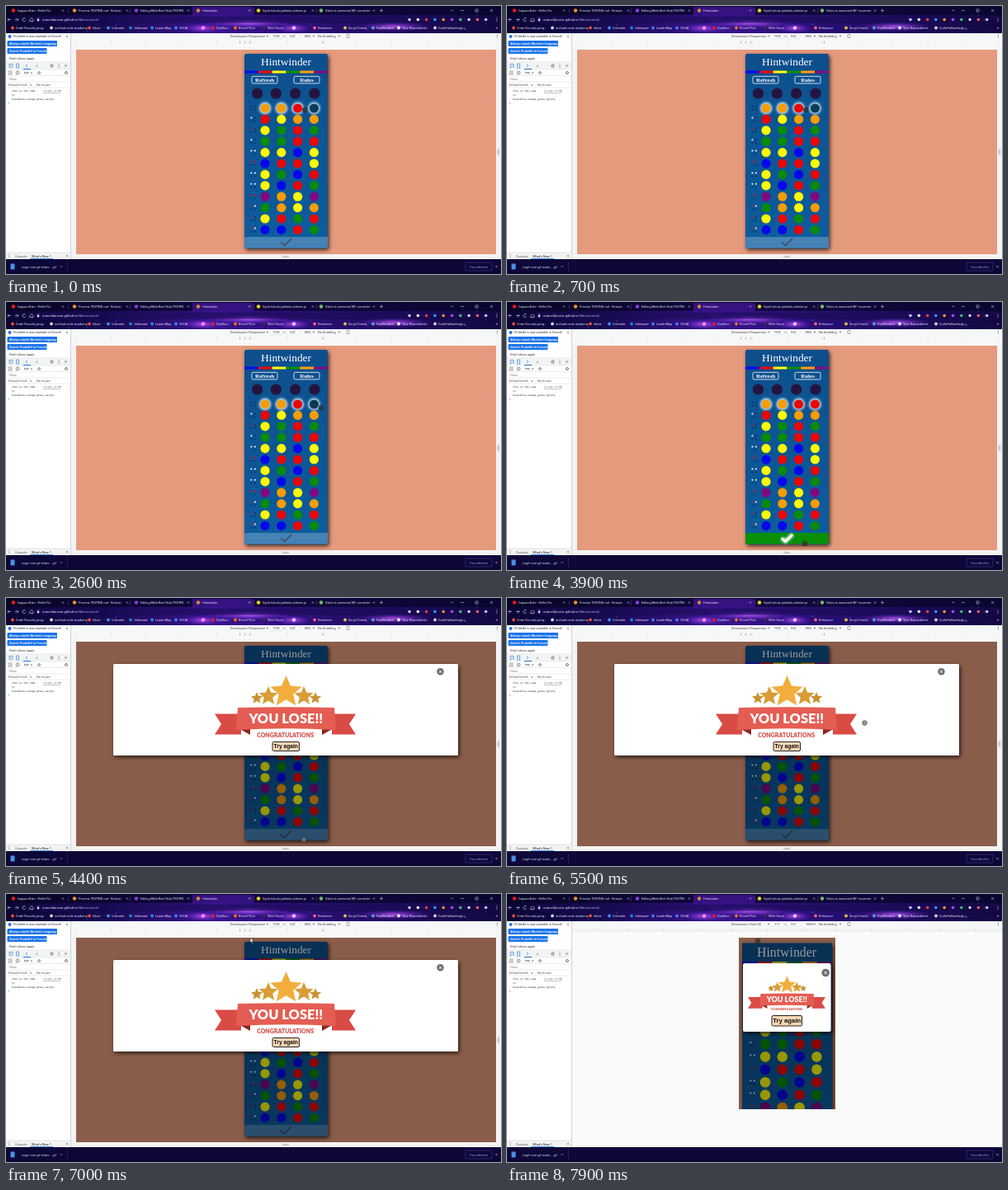
Animation of 600 by 325 pixels, one loop 8000 ms. Source, as an HTML page:

```html
<!DOCTYPE html>
<html lang="en">
<head>
<meta charset="utf-8">
<title>Peg game</title>
<style>
html, body { margin: 0; width: 100%; height: 100%; overflow: hidden; background: #fff; }
svg { display: block; width: 600px; height: 325px; }
text { font-family: Roboto, "Open Sans", sans-serif; white-space: pre; }
.serif { font-family: "Liberation Serif", "Noto Serif", serif; }
.mono { font-family: "DejaVu Sans Mono", "Noto Sans Mono", monospace; }
.bold { font-family: Lato, "Open Sans", sans-serif; font-weight: 900; }
.button { font-family: "Liberation Sans", sans-serif; font-weight: 700; }
</style>
</head>
<body>
<svg id="stage" viewBox="0 0 600 325">
<defs>
  <linearGradient id="sky">
    <stop offset="0" stop-color="#0b0634"/><stop offset=".2" stop-color="#170a52"/>
    <stop offset=".42" stop-color="#3b1390"/><stop offset=".6" stop-color="#2a0f78"/>
    <stop offset=".8" stop-color="#1d0b5c"/><stop offset="1" stop-color="#12083f"/>
  </linearGradient>
  <linearGradient id="frame">
    <stop offset="0" stop-color="#080428"/><stop offset=".5" stop-color="#12083f"/><stop offset="1" stop-color="#0a0530"/>
  </linearGradient>
  <linearGradient id="board" x2="0" y2="1">
    <stop offset="0" stop-color="#0b4f8c"/><stop offset="1" stop-color="#0d5c9e"/>
  </linearGradient>
  <radialGradient id="nebula"><stop offset="0" stop-color="#c85cff" stop-opacity=".85"/><stop offset="1" stop-color="#5a20c8" stop-opacity="0"/></radialGradient>
  <filter id="glow" x="-1" y="-1" width="3" height="3"><feGaussianBlur stdDeviation="1.5"/></filter>
  <filter id="shadow" x="-.2" y="-.2" width="1.4" height="1.4"><feDropShadow dx="1.5" dy="2" stdDeviation="2.6" flood-opacity=".75"/></filter>
  <clipPath id="phoneClip"><rect x="281" y="53" width="117" height="208"/></clipPath>
</defs>
</svg>
<script>
const LOOP = 8000, MODAL_AT = 4300, PHONE_AT = 7500;
const COLORS = { b: '#0808f0', r: '#ee0808', y: '#ffff08', g: '#0a8f0a', o: '#f8a008', p: '#820a82', n: '#0c3d55' };
const ROWS = ['oorn', 'ryoo', 'ygrg', 'ggrr', 'yyby', 'brry', 'ygbr', 'ybrg', 'poyp', 'goyo', 'yrgr', 'bbrg'];
const PEGS = ['', 'w', 'r', 'w', 'ww', 'rr', 'ww', 'ww', 'rr', 'rw', 'r', 'rw'];
const GAME = 'Hintwinder';

const attrs = o => Object.entries(o).map(([k, v]) => ` ${k}="${v}"`).join('');
const rect = (x, y, w, h, fill, o = {}) => `<rect${attrs({ x, y, width: w, height: h, fill, ...o })}/>`;
const disc = (cx, cy, r, fill, o = {}) => `<circle${attrs({ cx, cy, r, fill, ...o })}/>`;
const path = (d, stroke, w = .6, o = {}) => `<path${attrs({ d, stroke, 'stroke-width': w, fill: 'none', ...o })}/>`;
const text = (x, y, s, fill, size = 4, o = {}) => `<text${attrs({ x, y, fill, 'font-size': size, ...o })}>${s}</text>`;
const middle = { 'text-anchor': 'middle' };
const group = (id, body, o = {}) => `<g${attrs({ id, ...o })}>${body}</g>`;
const cross = (x, y, r, color, w) => path(`M${x - r} ${y - r}l${2 * r} ${2 * r}m0 ${-2 * r}l${-2 * r} ${2 * r}`, color, w);
const caret = (x, y, color = '#555') => `<path d="M${x - 1.2} ${y - .6}h2.4l-1.2 1.6z" fill="${color}"/>`;

function seeded(seed) {
  return () => (seed = (seed * 16807) % 2147483647) / 2147483647;
}

function star(cx, cy, r, fill) {
  const points = Array.from({ length: 10 }, (_, i) => {
    const a = i * Math.PI / 5 - Math.PI / 2, d = i % 2 ? r * .46 : r;
    return `${(cx + d * Math.cos(a)).toFixed(1)},${(cy + d * Math.sin(a)).toFixed(1)}`;
  });
  return `<polygon points="${points.join(' ')}" fill="${fill}"/>`;
}

function browserTop() {
  const random = seeded(41), ink = '#e9e4ff';
  let s = rect(0, 0, 600, 33, 'url(#sky)') + rect(0, 0, 600, 11, 'url(#frame)');
  for (const [x, y, rx] of [[238, 27, 24], [348, 27, 22], [295, 21, 55], [470, 25, 45]])
    s += `<ellipse cx="${x}" cy="${y}" rx="${rx}" ry="6" fill="url(#nebula)"/>`;
  for (let i = 0; i < 90; i++)
    s += disc((random() * 600).toFixed(1), (11 + random() * 21).toFixed(1), (.15 + random() * .4).toFixed(2), '#b99cff', { opacity: .65 });
  s += '<path d="M226 11V3q0-2 2-2h70q2 0 2 2v8z" fill="#34127f"/>';
  const tabs = [
    [9, '#f01818', "L'aquarelliste - Reflet Du", 69], [83, '#f09030', `Preview TESTING.md - ${GAME.slice(0, 7)}`, 147],
    [158, '#8a3fd0', 'Editing Melo-Reef-Hub/TESTIN', 221], [233, '#d8843c', GAME, 295],
    [306, '#e8d820', 'Využi tuhoto pokladu odmien pr', 372], [382, '#70c060', 'Video to animated GIF converter', 446]
  ];
  for (const [x, color, label, close] of tabs)
    s += disc(x, 5.5, 2.2, color) + text(x + 5, 7, label, ink, 3.8) + cross(close, 5.5, 1, ink, .5);
  for (const x of [75, 150, 300, 376]) s += rect(x, 3, .4, 6, '#6656a0');
  s += path('M453 5.5h4m-2-2v4M539.5 4.5l1.5 1.5 1.5-1.5M551 5.5h4M587 4l3 3m0-3l-3 3', ink, .5) + rect(569, 4, 3, 3, 'none', { stroke: ink, 'stroke-width': .5 });
  s += path('M6 16.5H2m1.8-1.8L2 16.5l1.8 1.8M11 16.5h4m-1.8-1.8l1.8 1.8-1.8 1.8M23.6 15.4a2 2 0 1 0 .2 2M29 16.5l2-2 2 2v2h-4z', ink);
  s += rect(35, 12.5, 463, 8, '#180b50', { rx: 4, opacity: .55 }) + rect(37.8, 16, 2.4, 2.2, ink) + path('M38.2 16v-.8a.8.8 0 0 1 1.6 0v.8', ink, .4);
  s += text(44, 18, 'marcelduvern.github.io<tspan fill="#a99fd2">/Mastermind/</tspan>', ink, 4.2);
  ['#c8c0e8', '#f0f0f0', '#e04040', '#30a0f0', '#e8a020', '#a050e0', '#40c070', '#d0d0e8', '#e86060', '#c8c0e8']
    .forEach((c, i) => s += disc(489 + i * 10.3, 16.5, 1.8, c));
  s += path('M595 14.5v.1m0 1.8v.1m0 1.8v.1', ink, .9, { 'stroke-linecap': 'round' });
  const links = [
    [12, 'Code Foundry prog...', '#e85030'], [59, 'orchard code academy', '#d0d0e0'], [105, 'Inbox', '#e84838'],
    [128, 'Calendar', '#3a90f0'], [155, 'Jobboard', '#2080d0'], [181, 'Leads Map', '#3088d8'], [210, 'VELM', '#3a80ff'],
    [255, 'ClipBarn', '#f01818'], [282, 'Kernel Post', '#f07020'], [317, 'Web Chum', '#303050'], [378, 'Reference', '#f06080'],
    [415, 'Script Coach', '#e0c040'], [449, 'KeyMeadow', '#50a0d0'], [480, 'Your Repositories', '#e8e8f0'], [524, 'CodeHollowforge.j...', '#d0d0e0']
  ];
  for (const [x, label, color] of links) s += disc(x - 4, 26.5, 1.9, color) + text(x, 28, label, ink, 3.9);
  return s + disc(239, 26.5, 2.2, '#ff8be8') + disc(349, 26.5, 2.2, '#f0b8ff') + text(594, 28, '»', ink, 5);
}

function inspector() {
  const gray = '#555', blue = '#1a73e8';
  let s = rect(0, 33, 79, 274, '#fff') + disc(4.5, 37, 2, blue) + text(9, 38.4, 'ProbeKit is now available in French!', '#333', 3.7) + cross(74, 37, 1.1, gray, .5);
  s += rect(1.5, 42, 60.5, 7, blue, { rx: 1 }) + text(4, 47, "Always match Nimbra's language", '#fff', 3.9, { 'font-weight': 500 });
  s += rect(1.5, 51, 48, 7, blue, { rx: 1 }) + text(4, 56, 'Switch ProbeKit to French', '#fff', 3.9, { 'font-weight': 500 }) + text(4, 65.4, "Don't show again", '#333', 4);
  s += rect(0, 68, 79, 9, '#f1f3f4') + path('M0 68H79M0 77H79M0 84.5H79M0 92H79M0 99H79', '#d5d8dc', .5);
  s += path('M4 70.5h4v3.5M4 70.5v4h2M6 72.5l2.5 2.5M12.5 70h3v5h-3z', blue, .6);
  s += path('M24 71l1.8 1.5L24 74', blue, .7) + rect(21, 76, 9, 1, blue) + text(36, 74, '»', gray, 5);
  s += disc(55.5, 72.5, 1.5, 'none', { stroke: gray, 'stroke-width': .9 }) + path('M64 70.8v.1m0 1.6v.1m0 1.6v.1', gray, .9, { 'stroke-linecap': 'round' }) + cross(72.5, 72.5, 1.3, gray, .6);
  s += path('M3 79h4v4H3zM4.4 79.8l1.5 1.2-1.5 1.2M12.5 82.5l3-3', gray, .5) + disc(14, 81, 2, 'none', { stroke: gray, 'stroke-width': .6 });
  s += text(22, 82.4, 'top', '#333') + caret(31, 81) + disc(40, 81, 1.4, 'none', { stroke: gray, 'stroke-width': .7 }) + disc(73, 81, 1.5, 'none', { stroke: gray, 'stroke-width': .8 });
  s += text(4, 90, 'Filter', '#777') + text(3, 97, 'Default levels', '#555', 3.8) + caret(30, 96) + text(37, 97, 'No Issues', '#555', 3.8);
  const line = (y, t) => text(7, y, t, '#222', 2.95, { class: 'mono' });
  s += line(104, 'this is the code') + text(45, 104, 'script.js:50', '#444', 3, { class: 'mono', 'text-decoration': 'underline' });
  s += line(108.7, 'to') + line(113.6, 'breenblue,orange,green,purple') + path('M3 117l1.2 1.1-1.2 1.1', blue, .5);
  s += rect(0, 299, 79, 8, '#f1f3f4') + path('M0 299H79', '#ccc', .5) + path('M4 301.4v.1m0 1.5v.1m0 1.5v.1', gray, .7, { 'stroke-linecap': 'round' });
  s += text(11, 304.5, 'Console', gray, 4) + text(31, 304.5, "What's New", '#222', 4) + cross(54, 303, .8, gray, .4) + rect(29, 306.2, 28, .8, blue) + cross(74, 303, 1.1, gray, .5);
  return s + rect(78, 33, .8, 274, '#c8c8cc');
}

function deviceBar(name, width, height, percent) {
  const ink = '#444', box = (x, value) => rect(x, 33.8, 15, 5.6, '#fff', { stroke: '#d4d4d4', 'stroke-width': .4 }) + text(x + 7.5, 38, value, ink, 3.8, middle);
  return rect(79, 33, 521, 9, '#f6f7f8') + text(272, 38, `Dimensions: ${name}`, ink, 3.9) + caret(317, 36.6)
    + box(320, width) + text(337.5, 38, '×', ink, 3.5, middle) + box(340, height)
    + text(362, 38, percent, ink, 3.9) + caret(373, 36.6) + text(378, 38, 'No throttling', ink, 3.9) + caret(404, 36.6)
    + path('M413 34.5h3v4h-3z', ink, .4) + path('M595.5 34.8v.1m0 1.6v.1m0 1.6v.1', ink, .8, { 'stroke-linecap': 'round' });
}

function ball(x, y, r, key, id) {
  const ring = f => disc(x, y, r * f, 'none', { stroke: '#000', 'stroke-width': .45, 'stroke-dasharray': '.6 .8', opacity: .28 });
  return disc(x, y, r, COLORS[key], id ? { id } : {}) + ring(.85) + ring(.45);
}

function rows({ x, dx, y, dy, r, pegX, lastId }) {
  return ROWS.map((row, i) => {
    const cy = y + i * dy;
    let s = '';
    for (let k = 0; k < 4; k++)
      s += disc(pegX + k % 2 * 4.4, cy - 2 + (k >> 1) * 4, 1, { w: '#fff', r: '#e00c1c' }[PEGS[i][k]] || '#0a3566');
    return s + [...row].map((key, k) => {
      const cx = x + k * dx, halo = i ? '' : disc(cx, cy, r + 1.6, '#cfeaff', { filter: 'url(#glow)' });
      return halo + ball(cx, cy, r, key, i === 0 && k === 3 && lastId);
    }).join('');
  }).join('');
}

const stripe = (x, y, w, h) => [...'brygop'].map((key, i) => rect(x + i * w, y, w, h, COLORS[key])).join('');

function desktopBoard() {
  let s = rect(289, 58, 101, 236, 'url(#board)', { rx: 2, filter: 'url(#shadow)' });
  s += text(339.5, 72, GAME, '#fff', 13.4, { ...middle, class: 'serif' }) + stripe(289, 78.5, 16.83, 3);
  for (const [x, label] of [[298, 'Refresh'], [349, 'Rules']])
    s += rect(x, 85.3, 31, 8.6, 'none', { rx: 1.5, stroke: '#fff', 'stroke-width': .8 }) + text(x + 15.5, 92, label, '#fff', 7, { ...middle, class: 'serif', 'font-weight': 700 });
  for (const x of [304.5, 327.3, 350.7, 374])
    s += disc(x, 106, 6.6, '#21143d') + [2, 4.5].map(r => disc(x, 106, r, 'none', { stroke: '#6b1748', 'stroke-width': .6, 'stroke-dasharray': '.7 1.3' })).join('');
  s += rows({ x: 314, dx: 19.8, y: 124, dy: 13.4, r: 5.6, pegX: 297.4, lastId: 'lastPick' });
  s += rect(289, 280, 101, 13.5, '#4682b4', { id: 'strip', rx: 1.5 });
  const check = 'M333 286.5l4.5 4 8.5-8.5';
  return s + path(check, '#39465c', 1.3, { id: 'checkDark' })
    + group('checkLit', path(check, '#fff', 4, { filter: 'url(#glow)' }) + path(check, '#fff', 2.6));
}

function award() {
  let s = star(304, 121.5, 7.5, '#c9922f') + star(375, 121.5, 7.5, '#c9922f') + star(318, 119, 12, '#d89d35') + star(361, 119, 12, '#d89d35') + star(339.5, 114, 20, '#f2ad3c');
  s += '<path d="M253 140.5h32v25h-32l8-12.5zM424 140.5h-29v25h29l-8-12.5z" fill="#d84c45"/>';
  s += '<path d="M280 157h16v9zM399 157h-16v9z" fill="#8e2722"/>';
  s += rect(296, 157, 87, 15, '#fff') + '<path d="M281 133Q339.5 131.5 398 133L400 160Q339.5 156.5 278.5 160z" fill="#e45d53"/>';
  return s + text(339.3, 151.8, 'YOU LOSE!!', '#fff', 16.4, { ...middle, class: 'bold' })
    + text(338.6, 168.6, 'CONGRATULATIONS', '#d84c45', 7, { ...middle, class: 'bold' });
}

const closeButton = (x, y, r) => disc(x, y, r, '#6c6c6c') + cross(x, y, r * .38, '#fff', 1);
const retry = (x, y, w, h, size) => rect(x, y, w, h, '#f8d7b4', { rx: 1.5, stroke: '#222', 'stroke-width': 1 })
  + text(x + w / 2, y + h / 2 + size * .35, 'Try again', '#111', size, { ...middle, class: 'button' });

function desktop() {
  let s = rect(79, 42, 521, 265, '#f3f3f3') + rect(79, 42, 521, 10.5, '#f7f7f7');
  for (let x = 85; x < 596; x += 42.5) s += rect(x, 42.6, .5, 3, '#c4c4c4');
  for (const x of [283, 289, 295, 384]) s += rect(x, 42.6, 1, 3, '#b0b0b8');
  s += rect(85, 53, 509, 248, '#e59a7d') + desktopBoard();
  s += path('M335 303.3h8m-8 1.5h8M596.2 173.5v7m1.5-7v7', '#999', .6);
  const modal = rect(85, 53, 509, 248, '#000', { opacity: .4 }) + rect(130, 80, 418, 111, '#fff', { rx: 1.5, filter: 'url(#shadow)' })
    + award() + closeButton(526.5, 89.3, 4.2) + retry(323, 174.5, 32.5, 11, 6.7);
  return deviceBar('Responsive', 1994, 822, '88%') + s + group('modal', modal);
}

function phone() {
  let s = rect(281, 53, 117, 208, '#e59a7d') + rect(285, 59.5, 109, 210, 'url(#board)', { filter: 'url(#shadow)' });
  s += text(339, 75.5, GAME, '#fff', 15.8, { ...middle, class: 'serif' }) + stripe(285, 82, 18.17, 3);
  s += rows({ x: 313, dx: 20.8, y: 135.8, dy: 15.4, r: 6.3, pegX: 295.3 });
  s += rect(281, 53, 117, 208, '#000', { opacity: .4 });
  s += rect(286, 84, 106.5, 83, '#fff', { rx: 2, filter: 'url(#shadow)' });
  s += group('smallAward', award(), { transform: 'translate(339.5 99.5) scale(.55) translate(-339.5 -94)' });
  s += closeButton(386.2, 95.5, 4.8) + retry(321, 147.5, 36.5, 12.5, 7.8);
  return deviceBar('Oriel S4', 375, 667, '100%') + rect(79, 42, 521, 265, '#fafafa') + rect(79, 42, 521, 4, '#eef0f1')
    + Array.from({ length: 12 }, (_, i) => rect(105 + i * 42, 42, .6, 4, '#d6d9dc')).join('')
    + group('phoneView', s, { 'clip-path': 'url(#phoneClip)' });
}

function downloads() {
  const ink = '#d9d4f2';
  return rect(0, 307, 600, 18, '#0e0838') + rect(5.5, 312.5, 5, 7, '#4a90e8', { rx: .5 })
    + text(19, 317.5, 'ezgif.com-gif-make....gif', ink, 3.9) + path('M65.5 316.7l1.5-1.5 1.5 1.5', ink, .5) + rect(74, 310, .4, 12, '#4b4080')
    + rect(557, 311, 32, 10, 'none', { rx: 1, stroke: '#463b86', 'stroke-width': .6 }) + text(573, 317.5, 'Tout afficher', '#7fa8f5', 4, middle) + cross(594.5, 316, 1.1, ink, .5);
}

const pointer = disc(0, 0, 3, '#333', { id: 'touch', stroke: '#222', 'stroke-width': .5, opacity: .8 })
  + '<path id="arrow" d="M-1-3v6l1.4-1.3 1 2.2 1-.4-1-2.2h1.9z" fill="#fff" stroke="#111" stroke-width=".5"/>';
const stage = document.getElementById('stage');
stage.insertAdjacentHTML('beforeend', rect(0, 0, 600, 325, '#fff') + group('desktop', desktop()) + group('phone', phone())
  + inspector() + browserTop() + downloads() + group('pointer', pointer));

const $ = id => document.getElementById(id);
const show = (id, on) => $(id).setAttribute('display', on ? 'inline' : 'none');

// Pointer stops: time, x, y
const STOPS = [[0, 362, 126], [1700, 362, 126], [2500, 382, 128], [2700, 382, 128], [2900, 374, 125], [3200, 374, 125],
  [3750, 361, 293], [4400, 361, 293], [5300, 433.5, 151.5], [5900, 433.5, 151.5], [6900, 297, 56], [7100, 297, 56],
  [7300, 296, 38], [7500, 296, 44], [7800, 304, 57], [8000, 304, 57]];

function pointerAt(t) {
  const i = STOPS.findIndex(stop => stop[0] > t), [t0, x0, y0] = STOPS[i - 1], [t1, x1, y1] = STOPS[i];
  const p = (t - t0) / (t1 - t0), e = p * p * (3 - 2 * p);
  return [x0 + (x1 - x0) * e, y0 + (y1 - y0) * e];
}

function render(t) {
  const [x, y] = pointerAt(t), lost = t >= MODAL_AT, small = t >= PHONE_AT;
  const hover = !lost && y > 280, arrow = y < 57 && !small;
  show('desktop', !small);
  show('phone', small);
  show('modal', lost);
  show('checkLit', hover);
  show('checkDark', !hover);
  show('arrow', arrow);
  show('touch', !arrow);
  $('strip').setAttribute('fill', hover ? '#0a8f0a' : '#4682b4');
  $('lastPick').setAttribute('fill', COLORS[t < 2900 ? 'n' : t < 3100 ? 'b' : 'r']);
  $('touch').setAttribute('fill', lost && !small ? '#777' : '#333');
  $('pointer').setAttribute('transform', `translate(${x.toFixed(2)} ${y.toFixed(2)})`);
}

const start = performance.now();
function tick() {
  render((performance.now() - start) % LOOP);
  requestAnimationFrame(tick);
}
tick();
</script>
</body>
</html>
```
